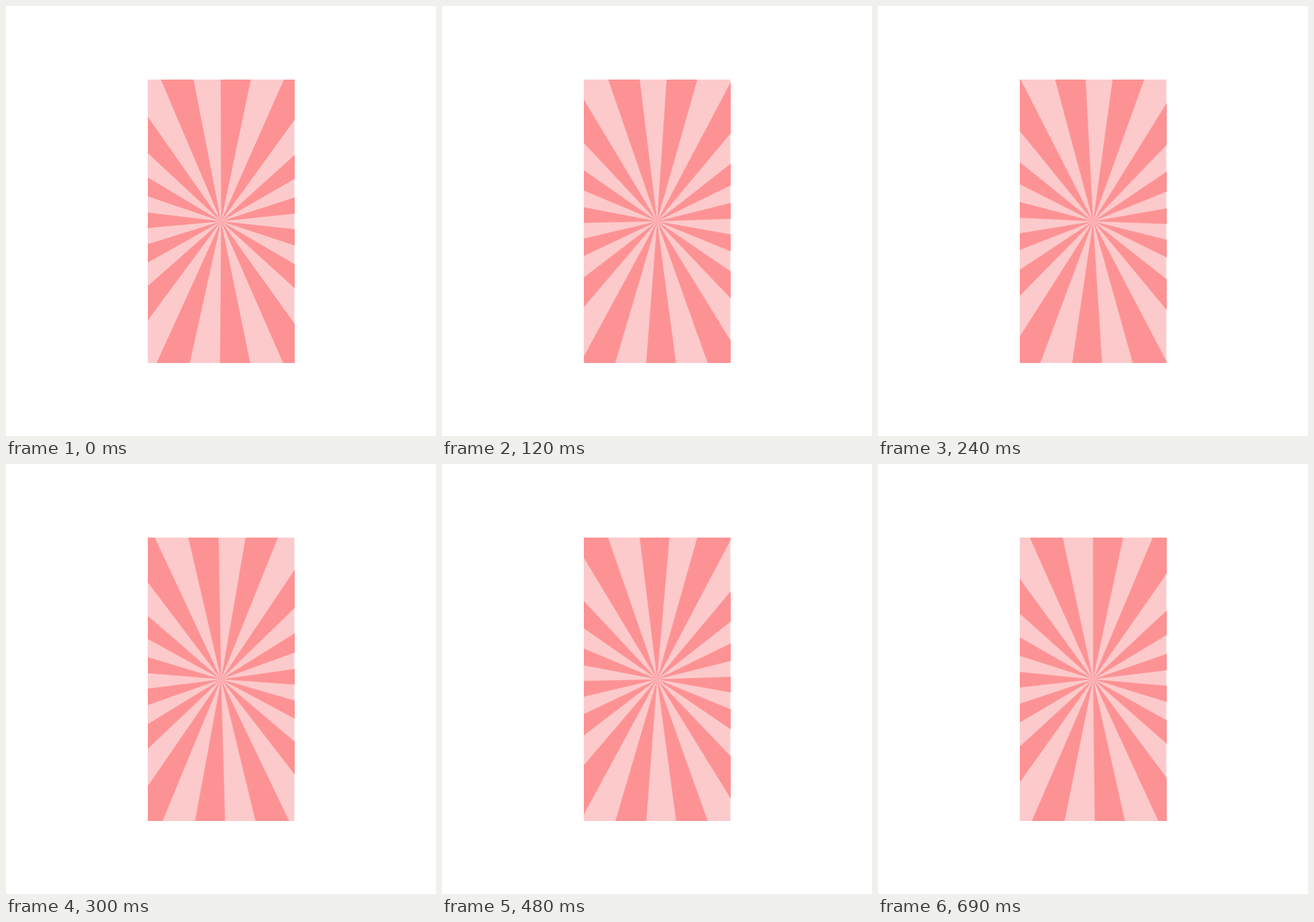
Recreate the animation shown at these times as an HTML page. Size 749 px wide and 748 px high, loop 0.72 s.

```html
<!DOCTYPE html>
<html lang="en">
<head>
<meta charset="utf-8">
<title>Sunburst</title>
<style>
  html, body { margin: 0; width: 100%; height: 100%; overflow: hidden; background: #fff; }
  svg { display: block; width: 749px; height: 748px; }
  #rays { fill: #fd9294; transform-origin: 374.7px 374.5px; }
</style>
</head>
<body>
<svg viewBox="0 0 749 748">
  <clipPath id="card"><rect x="247" y="128" width="255.5" height="493"/></clipPath>
  <g clip-path="url(#card)">
    <rect x="247" y="128" width="255.5" height="493" fill="#fccacb"/>
    <path id="rays"/>
  </g>
</svg>
<script>
  const CX = 374.7, CY = 374.5, RADIUS = 320;
  const RAYS = 15, START = -0.17;
  // Slightly over 12 degrees, so the last gap closes narrower than the rest.
  const WIDTH = 12.04;

  const point = deg => {
    const a = deg * Math.PI / 180;
    return `${(CX + RADIUS * Math.sin(a)).toFixed(3)} ${(CY - RADIUS * Math.cos(a)).toFixed(3)}`;
  };

  const wedge = (_, i) => {
    const from = START + 2 * WIDTH * i;
    return `M${CX} ${CY}L${point(from)}L${point(from + WIDTH)}Z`;
  };

  const rays = document.getElementById('rays');
  rays.setAttribute('d', Array.from({ length: RAYS }, wedge).join(''));

  // One degree every 30 ms.
  rays.animate(
    [{ transform: 'rotate(0deg)' }, { transform: 'rotate(24deg)' }],
    { duration: 720, iterations: Infinity, easing: 'steps(24, end)' }
  );
</script>
</body>
</html>
```
